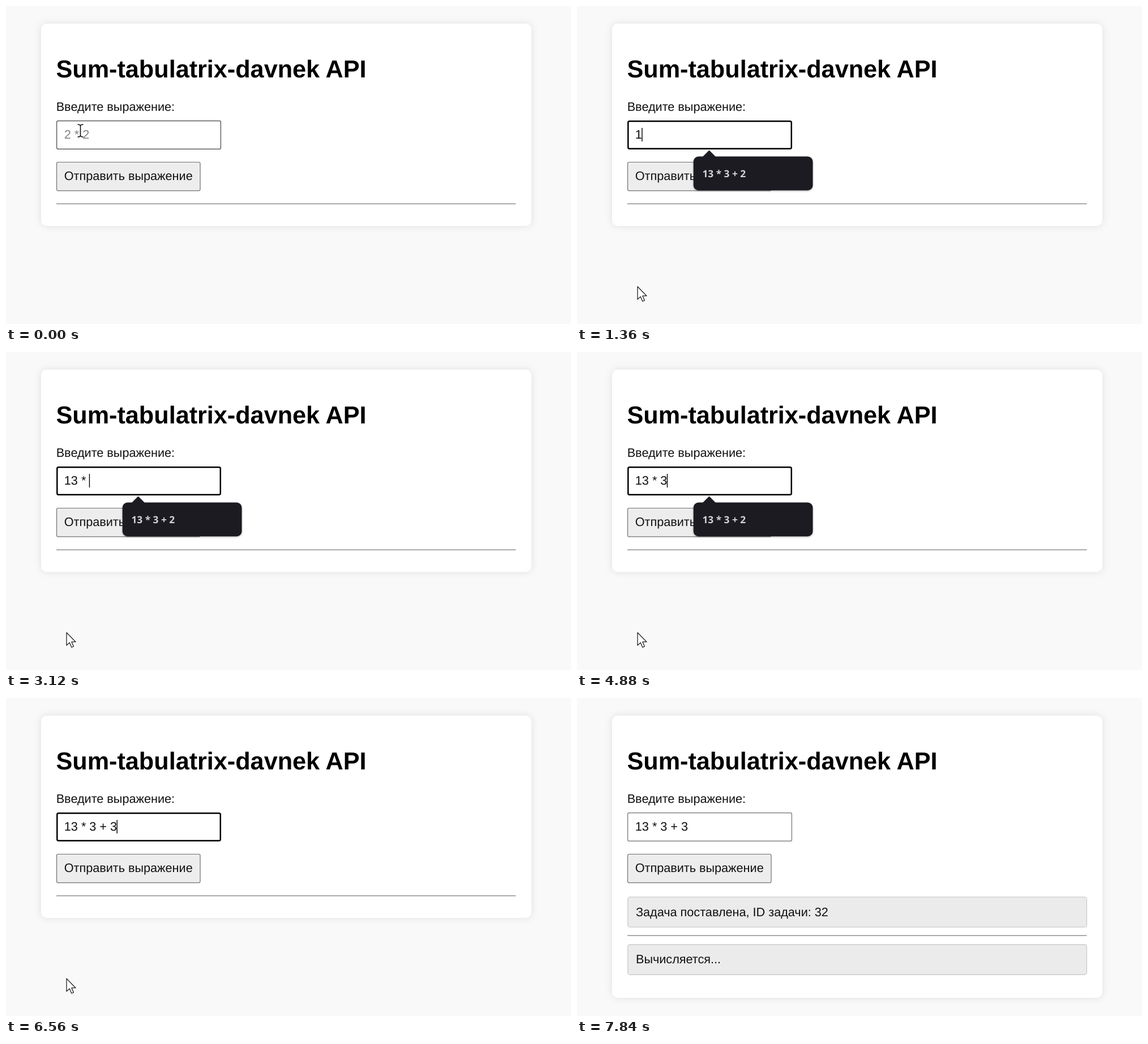
Write an HTML page that moves like this. It is 998 px wide and 561 px high and loops after 8000 ms.

```html
<!DOCTYPE html>
<html lang="ru">
<head>
<meta charset="utf-8">
<title>Calculator</title>
<style>
html, body { margin: 0; height: 100%; overflow: hidden; background: #f9f9f9; }
svg { display: block; width: 100%; height: 100%; }
text { font: 21.65px "Liberation Sans", Arial, sans-serif; fill: #111; white-space: pre; text-rendering: geometricPrecision; }
#title { font-size: 43.2px; font-weight: bold; fill: #000; }
#card { fill: #fff; filter: drop-shadow(0 0 6.8px rgba(0, 0, 0, .1)); }
#menu { fill: #1c1b22; filter: drop-shadow(0 1px 1.5px rgba(0, 0, 0, .35)); }
#items text { font: 700 17.3px "Open Sans", "Noto Sans", sans-serif; fill: #d4d4d8; }
.result { fill: #ebebeb; stroke: #ccc; stroke-width: 1.3; }
</style>
</head>
<body>
<svg viewBox="0 0 998 561">
  <rect width="998" height="561" fill="#f9f9f9"/>
  <rect id="card" x="62" y="31" width="866" height="357" rx="10"/>
  <text id="title" x="88.5" y="126.2">Sum-tabulatrix-davnek API</text>
  <text x="88.7" y="185.4">Введите выражение:</text>

  <rect id="field" fill="#fff"/>
  <text id="value" x="102.8" y="234.3"></text>
  <rect id="caret" y="215" width="1.4" height="24"/>

  <rect id="button" x="89.5" y="275.5" width="253.5" height="50.3" rx="2.5" stroke="#707070" stroke-width="1.2"/>
  <text x="216.2" y="307.3" text-anchor="middle">Отправить выражение</text>

  <rect id="rule" x="89" width="811.5" height="1.8" fill="#a2a2a2"/>
  <g id="results">
    <rect class="result" x="89.7" y="351.2" width="810.7" height="53" rx="4"/>
    <text x="104" y="384.5">Задача поставлена, ID задачи: 32</text>
    <rect class="result" x="89.7" y="435" width="810.7" height="53" rx="4"/>
    <text x="104" y="468">Вычисляется...</text>
  </g>

  <g id="popup">
    <g id="menu">
      <path d="M221 267L233.5 254.5L246 267Z"/>
      <rect id="panel" x="205.7" y="265.5" width="210.8" rx="9"/>
    </g>
    <g id="items"></g>
  </g>

  <path id="beam" d="M-5 -11Q0 -11 0 -8Q0 -11 5 -11M0 -8V8M-5 11Q0 11 0 8Q0 11 5 11" fill="none" stroke="#111" stroke-width="1.6"/>
  <path id="arrow" d="M0 0V22.5L5.2 17.8L8.8 26L12.4 24.4L8.9 16.4H16Z" fill="#fff" stroke="#222" stroke-width="1.3" stroke-linejoin="round"/>
</svg>
<script>
const LOOP = 8000, STEP = 80, BLINK = 530;
const FOCUS = 240, MENU = 320, BLUR = 7440, DONE = 7600;
const typed = "13 * 3 + 3";
const keys = [1120, 2000, 2400, 2720, 2960, 3310, 5280, 5440, 5840, 6080];
const history = ["3 - 4", "5 - 4", "2 + 2 - 44", "2 * 2 + 2", "2 + 2 * 2", "13 * 3 + 2"];
// Pointer path: time, x, y
const path = [[0, 131.5, 220], [320, 131.5, 220], [720, 110, 487], [880, 107, 495],
  [6640, 107, 495], [6880, 225, 302], [7520, 225, 302], [7760, 250, 580]];

const el = id => document.getElementById(id);
const set = (id, attrs) => {
  for (const k in attrs) el(id).setAttribute(k, attrs[k]);
};
const show = (id, on) => set(id, { visibility: on ? "visible" : "hidden" });

function pointer(t) {
  const i = path.findIndex(p => p[0] > t);
  if (i < 0) return path[path.length - 1].slice(1);
  const [a, x, y] = path[i - 1], [b, u, v] = path[i];
  const f = (t - a) / (b - a), e = f * f * (3 - 2 * f);
  return [x + (u - x) * e, y + (v - y) * e];
}

function inside(x, y, top, right, bottom) {
  return x > 89 && x < right && y > top && y < bottom;
}

function drawField(t, focused, hover) {
  const count = keys.filter(k => k <= t).length;
  const text = typed.slice(0, count);
  const w = focused ? 2.5 : 1.2;
  set("field", {
    x: 89 + w / 2, y: 202 + w / 2, width: 291 - w, height: 51 - w, rx: 2.5,
    "stroke-width": w, stroke: focused ? "#000" : hover ? "#444" : "#707070"
  });
  el("value").textContent = text || "2 * 2";
  el("value").style.fill = text ? "#111" : "#858585";
  const since = t - (count ? keys[count - 1] : FOCUS);
  show("caret", focused && since % (2 * BLINK) < BLINK);
  set("caret", { x: 102.2 + (text ? el("value").getComputedTextLength() : 0) });
  return text;
}

function drawMenu(t, text) {
  const list = t < MENU ? [] : history.filter(s => s.startsWith(text));
  show("popup", list.length);
  set("panel", { height: 11 + 48.7 * list.length });
  el("items").innerHTML = list.map((s, i) => `<text x="221.5" y="${302 + 48.7 * i}">${s}</text>`).join("");
}

function draw(now) {
  const t = Math.floor(now % LOOP / STEP) * STEP;
  const [x, y] = pointer(t);
  const overField = inside(x, y, 202, 380, 253);
  const overButton = inside(x, y, 275, 343, 326);
  const done = t >= DONE;

  drawMenu(t, drawField(t, t >= FOCUS && t < BLUR, overField));
  set("button", { fill: overButton ? "#dcdcdc" : "#ededed" });
  set("card", { height: done ? 498 : 357 });
  set("rule", { y: done ? 418.2 : 348 });
  show("results", done);

  show("beam", overField);
  show("arrow", !overField);
  set(overField ? "beam" : "arrow", { transform: `translate(${x} ${y})` });
}

const start = performance.now();
function tick() {
  draw(performance.now() - start);
  requestAnimationFrame(tick);
}
tick();
</script>
</body>
</html>
```
